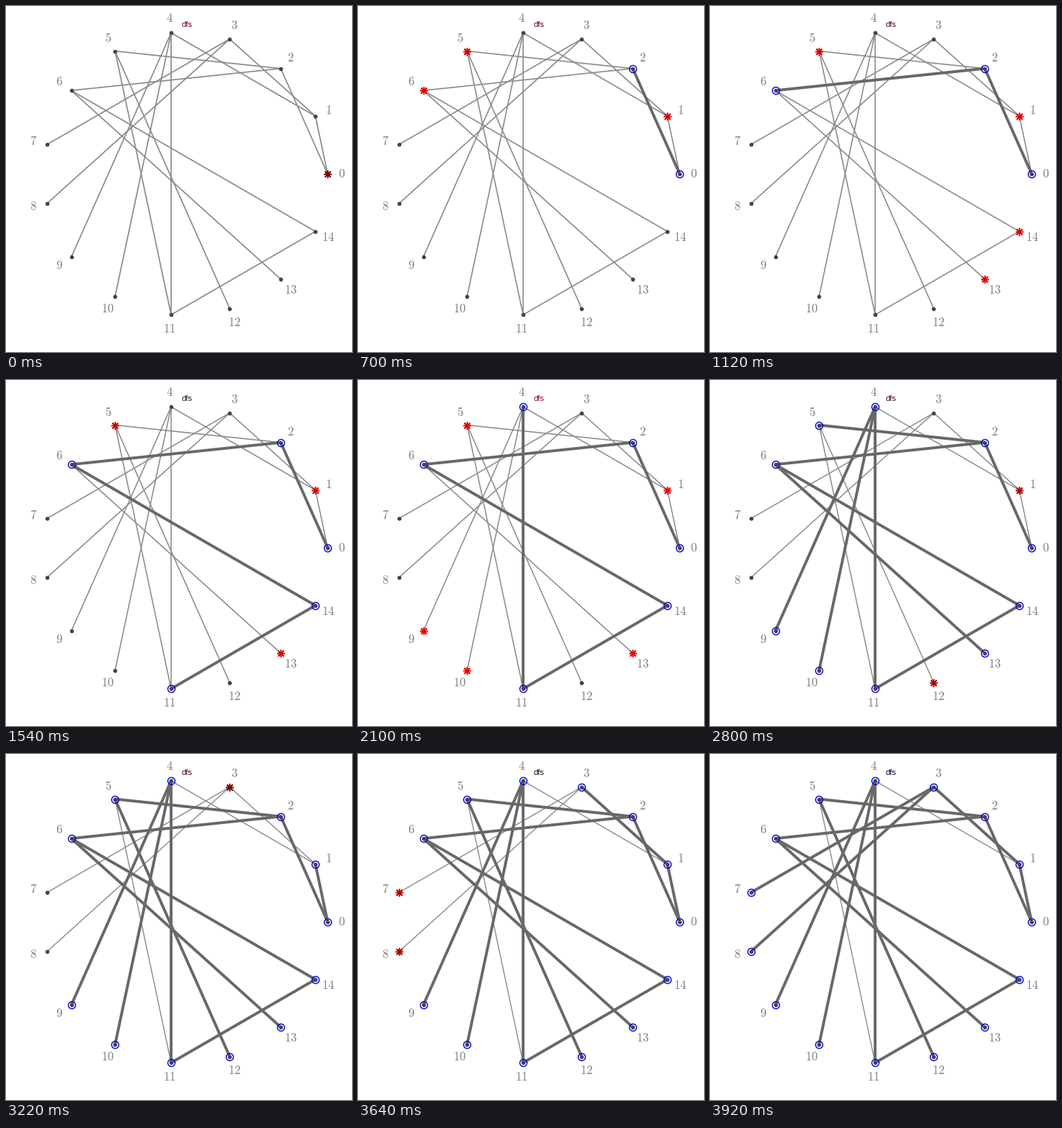
Animation of 480x480 px, one loop 4060 ms. Source, as a matplotlib script:

```python
import numpy as np
import matplotlib.pyplot as plt
from matplotlib.animation import FuncAnimation

SIZE, DPI, STEP_MS = 480, 100, 140
PX = 72 / DPI  # one pixel in points
CENTER = np.array([249.6, 232.8])
RADIUS, LABEL_RADIUS = 196.6, 216.6
COUNT = 15

EDGES = [(0, 1), (0, 2), (1, 3), (1, 4), (2, 5), (2, 6), (3, 7), (3, 8),
         (4, 9), (4, 10), (4, 11), (5, 11), (5, 12), (6, 13), (6, 14), (11, 14)]
THIN, THICK = "#8a8a8a", "#686868"

# Caption tint over the run, as step -> RGB
TINT_STEPS = [0, 5, 11, 15, 20, 23, 28]
TINTS = np.array([(112, 0, 16), (96, 0, 44), (34, 20, 56), (136, 0, 52),
                  (64, 0, 48), (80, 0, 16), (0, 0, 48)]) / 255


def on_circle(node, radius):
    angle = 2 * np.pi * node / COUNT
    return CENTER + radius * np.array([np.cos(angle), -np.sin(angle)])


def neighbours(node):
    return sorted(b if a == node else a for a, b in EDGES if node in (a, b))


def search(start=0):
    """Snapshots of (visited, stack, tree edges) after each pop and push."""
    visited, stack, tree = [], [start], set()
    parent = {start: None}
    states = []

    def snap():
        states.append((list(visited), list(stack), set(tree)))

    snap()
    while stack:
        node = stack.pop()
        visited.append(node)
        if node != start:
            tree.add(tuple(sorted((node, parent[node]))))
            snap()
        for other in neighbours(node):
            if other not in parent:
                parent[other] = node
                stack.append(other)
                snap()
    return states


nodes = np.array([on_circle(n, RADIUS) for n in range(COUNT)])
states = search()

fig = plt.figure(figsize=(SIZE / DPI, SIZE / DPI), dpi=DPI, facecolor="white")
ax = fig.add_axes([0, 0, 1, 1])
ax.set_xlim(0, SIZE)
ax.set_ylim(SIZE, 0)
ax.axis("off")

lines = {}
for a, b in EDGES:
    lines[a, b], = ax.plot(*nodes[[a, b]].T, snap=False, solid_capstyle="butt")

ax.plot(*nodes.T, "o", color="#444448", ms=5.6 * PX, mew=0, zorder=4)
stars, = ax.plot([], [], ls="", marker=(8, 2, 0), ms=11 * PX, mew=1.5 * PX, zorder=5)
rings, = ax.plot([], [], "o", mfc="none", mec="#0000d8", ms=10 * PX,
                 mew=1.4 * PX, zorder=5)

for n in range(COUNT):
    ax.text(*on_circle(n, LABEL_RADIUS), f"${n}$", color="#7c7c7c", size=12,
            math_fontfamily="cm", ha="center", va="center")
caption = ax.text(251.3, 28.6, "dfs", family="Liberation Sans", size=8,
                  ha="center", va="baseline", zorder=6)


def draw(step):
    visited, stack, tree = states[step]
    thin_width = np.interp(step, [0, 28], [1.7, 1.35])
    for edge, line in lines.items():
        used = edge in tree
        line.set_color(THICK if used else THIN)
        line.set_linewidth((3.9 if used else thin_width) * PX)
        line.set_zorder(3 if used else 2)
    rings.set_data(*nodes[visited].T if visited else ([], []))
    stars.set_data(*nodes[stack].T if stack else ([], []))
    red = np.interp(len(stack), [1, 2, 3, 5], [0.45, 0.67, 0.83, 0.92])
    stars.set_color((red, 0, 0))
    caption.set_color([np.interp(step, TINT_STEPS, c) for c in TINTS.T])
    return [*lines.values(), rings, stars, caption]


anim = FuncAnimation(fig, draw, frames=len(states), interval=STEP_MS,
                     repeat=True, repeat_delay=0, blit=False)
plt.show()
```
